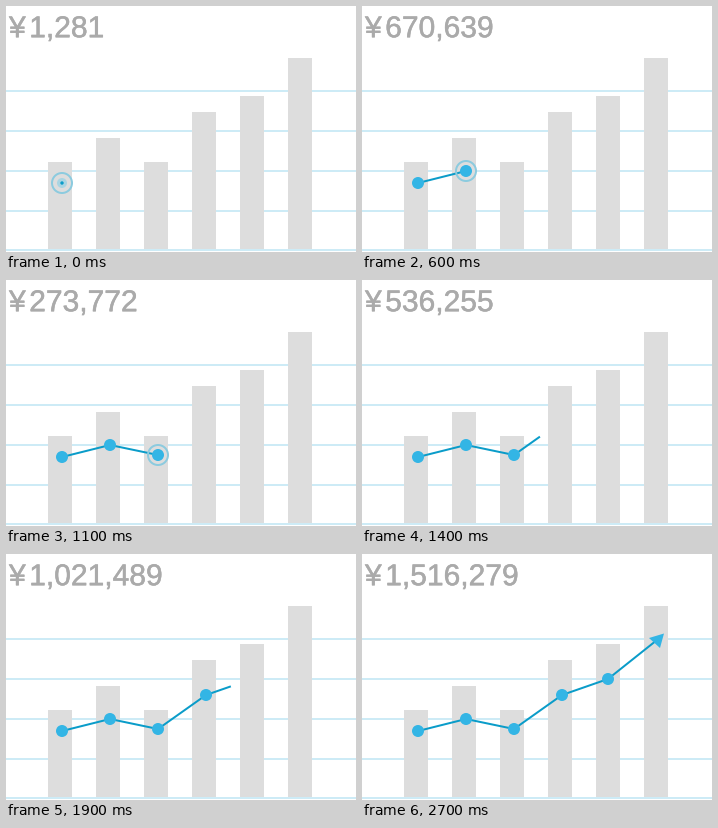
Write a matplotlib script that moves like this. It is 350 px wide and 246 px high and loops after 2.9 s.

```python
import matplotlib.pyplot as plt
import matplotlib.patheffects as pe
from matplotlib.animation import FuncAnimation
from matplotlib.patches import Circle, Polygon, Rectangle
import numpy as np

W, H, DPI = 350, 246, 100
PX = 72 / DPI

GREY, BAR, GRID = "#aaaaaa", "#dddddd", "#cdebf6"
LINE, DOT, RING = "#0a9cc9", "#33b5e5", "#8ccbdf"

POINTS = np.array([(56, 177), (104, 165), (152, 175),
                   (200, 141), (246, 125), (295, 86)], float)
TOTALS = [563271, 670639, 273772, 759852, 1244399, 1516279]
MIDWAY = [621168, 456331, 536255, 1021489, 1391510]
BAR_TOPS = [156, 132, 156, 106, 90, 52]

HALF = 0.54                      # share of a segment drawn at its second step
STEPS = [0.27, HALF, 1, 1]
LAST_STEPS = [0.27, HALF, 0.82, 1, 1]

fig = plt.figure(figsize=(W / DPI, H / DPI), dpi=DPI, facecolor="white")
ax = fig.add_axes([0, 0, 1, 1])
ax.set(xlim=(0, W), ylim=(H, 0))
ax.axis("off")

for y in (85, 125, 165, 205, 244):
    ax.add_patch(Rectangle((0, y - 1), W, 2, color=GRID, lw=0, zorder=1))
for i, top in enumerate(BAR_TOPS):
    ax.add_patch(Rectangle((42 + 48 * i, top), 24, 243 - top,
                           color=BAR, lw=0, zorder=2))


def label(x, text):
    bold = [pe.withStroke(linewidth=0.5 * PX, foreground=GREY)]
    return ax.text(x, 31.2, text, color=GREY, family="Liberation Sans",
                   fontsize=30 * PX, va="baseline", path_effects=bold)


def disc(r, color, z):
    return ax.add_patch(Circle((0, 0), r, color=color, lw=0, zorder=z))


label(3, "¥")
amount = label(23.2, "")
path, = ax.plot([], [], color=LINE, lw=2 * PX, zorder=3,
                solid_capstyle="butt", solid_joinstyle="round")
dots = [disc(6, DOT, 4) for _ in POINTS[:-1]]
for dot, p in zip(dots, POINTS):
    dot.center = p
ring = ax.add_patch(Circle((0, 0), 10, fill=False, ec=RING,
                           lw=2 * PX, zorder=5))
halo = disc(5, "#a9d5e3", 5)
core = disc(1.7, LINE, 6)
arrow = ax.add_patch(Polygon([(302, 79.5), (287, 84), (298, 94)],
                             color=DOT, lw=0, zorder=5))


def count(seg, share):
    """Amount at a share of a segment, passing through its midway value."""
    return round(np.interp(share, [0, HALF, 1],
                           [TOTALS[seg], MIDWAY[seg], TOTALS[seg + 1]]))


def state(n):
    """Return full points, segment share, shown amount and marker phase."""
    if n < 3:
        return 0, 0, TOTALS[0] if n else 1281, "full" if n else "birth"
    seg, step = divmod(n - 3, 5)
    if seg >= 4:
        seg, step = 4, min(n - 23, 4)
        share = LAST_STEPS[step]
        value = count(4, 0.96 if step == 3 else share)
        return 4, share, value, ("", "", "", "", "arrow")[step]
    step = min(step, 3)
    share = STEPS[step]
    value = count(seg, 0.9 if step == 2 else share)
    return seg, share, value, ("", "", "birth", "full")[step]


def draw(n):
    seg, share, value, phase = state(n)
    tip = POINTS[seg] + share * (POINTS[seg + 1] - POINTS[seg])
    trail = np.vstack([POINTS[:seg + 1], tip])
    path.set_data(trail[:, 0], trail[:, 1])
    amount.set_text(f"{value:,}")

    here = seg + (share == 1)
    birth = phase == "birth"
    for i, dot in enumerate(dots):
        dot.set_visible(i < here or (i == here and not birth))
    ring.set_visible(phase in ("birth", "full"))
    for part in (halo, core):
        part.set_visible(birth)
    for part in (ring, halo, core):
        part.center = POINTS[here]
    arrow.set_visible(phase == "arrow")
    return path, amount


anim = FuncAnimation(fig, draw, frames=29, interval=100,
                     repeat=True, repeat_delay=0, blit=False)
plt.show()
```
